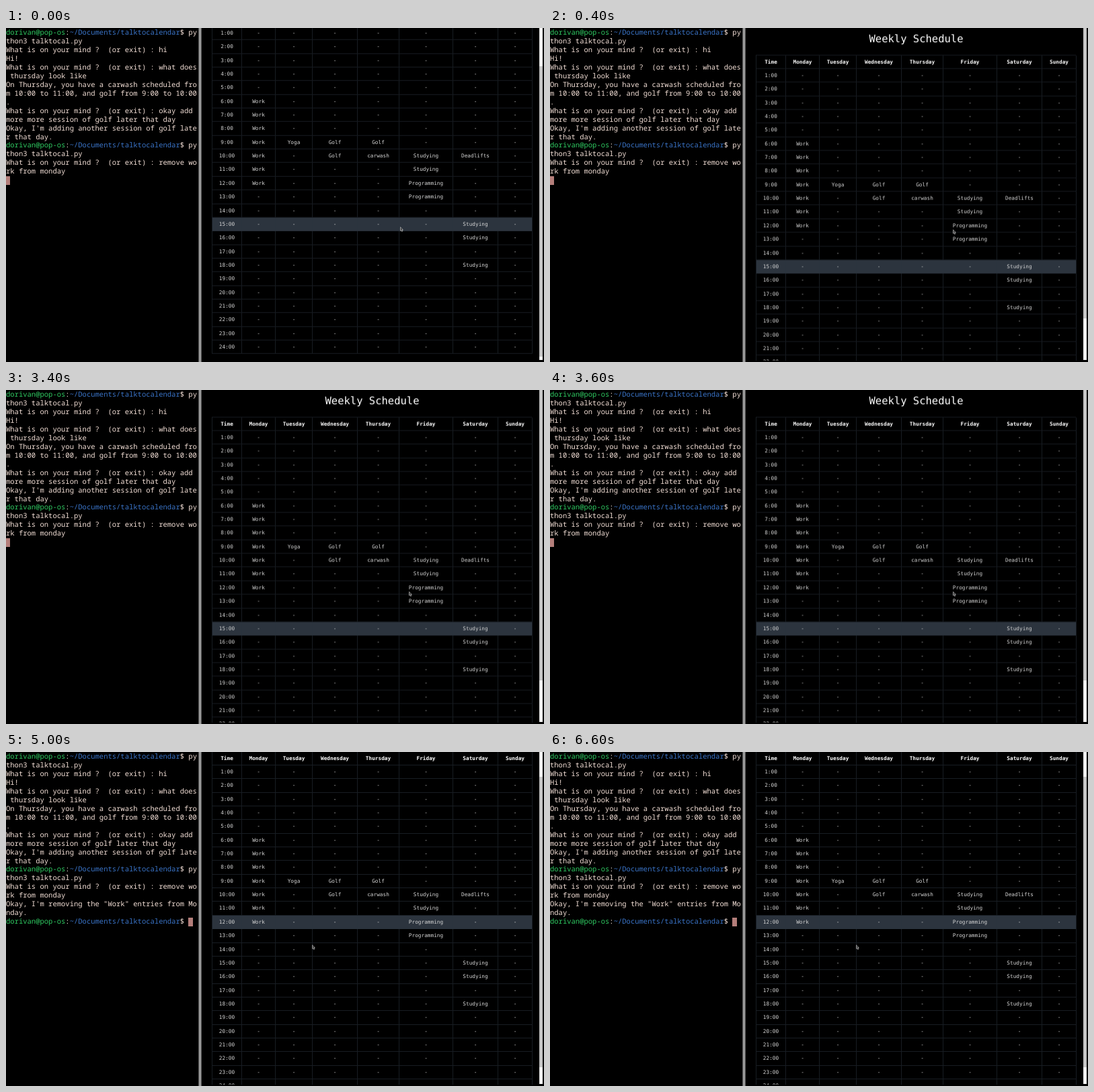
An HTML page that plays this animation: 800x498 px, repeating every 8 s.

```html
<!DOCTYPE html>
<html lang="en">
<head>
<meta charset="utf-8">
<title>Talk to calendar</title>
<style>
  html, body { margin: 0; width: 100%; height: 100%; overflow: hidden; background: #000; }
  body { position: relative; text-rendering: geometricPrecision; }
  body > * { position: absolute; }

  #terminal {
    left: 0; top: 1.1px; width: 286px; height: 496px; overflow: hidden; margin: 0;
    font: 10.52px/12.96px "Noto Sans Mono", monospace;
    color: #f3dfd6; white-space: pre;
  }
  #terminal b { color: #2fcb62; font-weight: 500; }
  #terminal i { color: #3a74c8; font-style: normal; font-weight: 500; }
  #terminal .caret { display: inline-block; width: 6.3px; height: 12.96px; background: #b47e7a; vertical-align: top; }
  #terminal .waiting, #terminal .answer { position: absolute; left: 0; top: 220.32px; }
  .waiting { animation: waiting 8s step-end infinite; }
  .answer { animation: answer 8s step-end infinite; }
  @keyframes waiting { 0% { opacity: 1 } 62.5%, 100% { opacity: 0 } }
  @keyframes answer { 0% { opacity: 0 } 62.5%, 100% { opacity: 1 } }

  #divider {
    left: 286px; top: 0; width: 5px; height: 498px;
    background: linear-gradient(90deg, #555 1px, #999 1px 4px, #555 4px);
  }

  #browser { left: 291px; top: 0; width: 501px; height: 496px; overflow: hidden; }
  #page {
    position: absolute; left: -291px; top: 0; width: 800px;
    font: 7.75px/20.36px "DejaVu Sans Mono", monospace; color: #d4d4d4;
    animation: scroll 8s step-end infinite;
  }
  @keyframes scroll {
    0%, 60% { transform: translateY(-63.2px) }
    2.5% { transform: translateY(-41px) }
    5% { transform: none }
    62.5%, 100% { transform: translateY(-41px) }
  }
  h1 {
    position: absolute; left: 306px; top: 6px; width: 477px; margin: 0;
    font: 15.5px/20px "DejaVu Sans Mono", monospace; color: #fff; text-align: center;
  }
  #schedule {
    --line: 1px solid #2c343e90;
    position: absolute; left: 306px; top: 39.5px; width: 476px; box-sizing: border-box;
    border-top: var(--line); border-left: var(--line);
  }
  .row { display: grid; grid-template-columns: 44px 50px 55px 67px 62px 80px 67px 51px; height: 20.36px; }
  .row > span { border-right: var(--line); border-bottom: var(--line); text-align: center; overflow: hidden; }
  .head { color: #fff; font-weight: bold; }
  .early { animation: early 8s step-end infinite; }
  .late { animation: late 8s step-end infinite; }
  @keyframes early { 0% { background: #2c343e } 60%, 100% { background: #0000 } }
  @keyframes late { 0% { background: #0000 } 60%, 100% { background: #2c343e } }

  #track { left: 793px; top: 0; width: 5px; height: 495px; background: #f0f0f0; }
  #thumb {
    position: absolute; left: 0; top: 0; width: 5px; height: 433px; background: #c6c6c6;
    animation: thumb 8s step-end infinite;
  }
  @keyframes thumb {
    0%, 60% { transform: translateY(57px) }
    2.5% { transform: translateY(37px) }
    5% { transform: none }
    62.5%, 100% { transform: translateY(37px) }
  }

  #pointer { left: 0; top: 0; width: 5.6px; height: 8px; animation: pointer 8s step-end infinite; }
  @keyframes pointer {
    0% { transform: translate(586px, 296.5px) }
    2.5% { transform: translate(593px, 298.5px) }
    5% { transform: translate(599px, 300.5px) }
    60%, 100% { transform: translate(455px, 287.5px) }
  }
</style>
</head>
<body>
<pre id="terminal"></pre>
<div id="divider"></div>
<div id="browser">
  <div id="page">
    <h1>Weekly Schedule</h1>
    <div id="schedule"></div>
  </div>
</div>
<div id="track"><div id="thumb"></div></div>
<svg id="pointer" viewBox="0 0 7 10">
  <path d="M.6.6V7.4L2.2 6 3.3 8.6 4.5 8.1 3.4 5.6H5.5Z" fill="#222" stroke="#ccc" stroke-width=".9"/>
</svg>
<script>
  const prompt = '<b>dorivan@pop-os</b>:<i>~/Documents/talktocalendar</i>$ ';
  const caret = '<span class="caret"></span>';
  const launch = prompt + 'py\nthon3 talktocal.py\n';
  const ask = 'What is on your mind ?  (or exit) : ';

  document.getElementById('terminal').innerHTML =
    launch +
    ask + 'hi\nHi!\n' +
    ask + 'what does\n thursday look like\n' +
    'On Thursday, you have a carwash scheduled fro\nm 10:00 to 11:00, and golf from 9:00 to 10:00\n.\n' +
    ask + 'okay add \nmore more session of golf later that day\n' +
    "Okay, I'm adding another session of golf late\nr that day.\n" +
    launch +
    ask + 'remove wo\nrk from monday\n' +
    `<span class="waiting">${caret}</span>` +
    `<span class="answer">Okay, I'm removing the "Work" entries from Mo\nnday.\n${prompt}${caret}</span>`;

  const days = ['Monday', 'Tuesday', 'Wednesday', 'Thursday', 'Friday', 'Saturday', 'Sunday'];
  const events = {
    Monday: { Work: [6, 7, 8, 9, 10, 11, 12] },
    Tuesday: { Yoga: [9] },
    Wednesday: { Golf: [9, 10] },
    Thursday: { Golf: [9], carwash: [10] },
    Friday: { Studying: [10, 11], Programming: [12, 13] },
    Saturday: { Deadlifts: [10], Studying: [15, 16, 18] }
  };
  const hovered = { 15: 'early', 12: 'late' };

  const eventAt = (day, hour) => {
    const found = Object.entries(events[day] || {}).find(([, hours]) => hours.includes(hour));
    return found ? found[0] : '-';
  };
  const row = (cells, style = '') =>
    `<div class="row ${style}">${cells.map(text => `<span>${text}</span>`).join('')}</div>`;

  let rows = row(['Time', ...days], 'head');
  for (let hour = 1; hour <= 24; hour++) {
    rows += row([`${hour}:00`, ...days.map(day => eventAt(day, hour))], hovered[hour]);
  }
  document.getElementById('schedule').innerHTML = rows;
</script>
</body>
</html>
```
